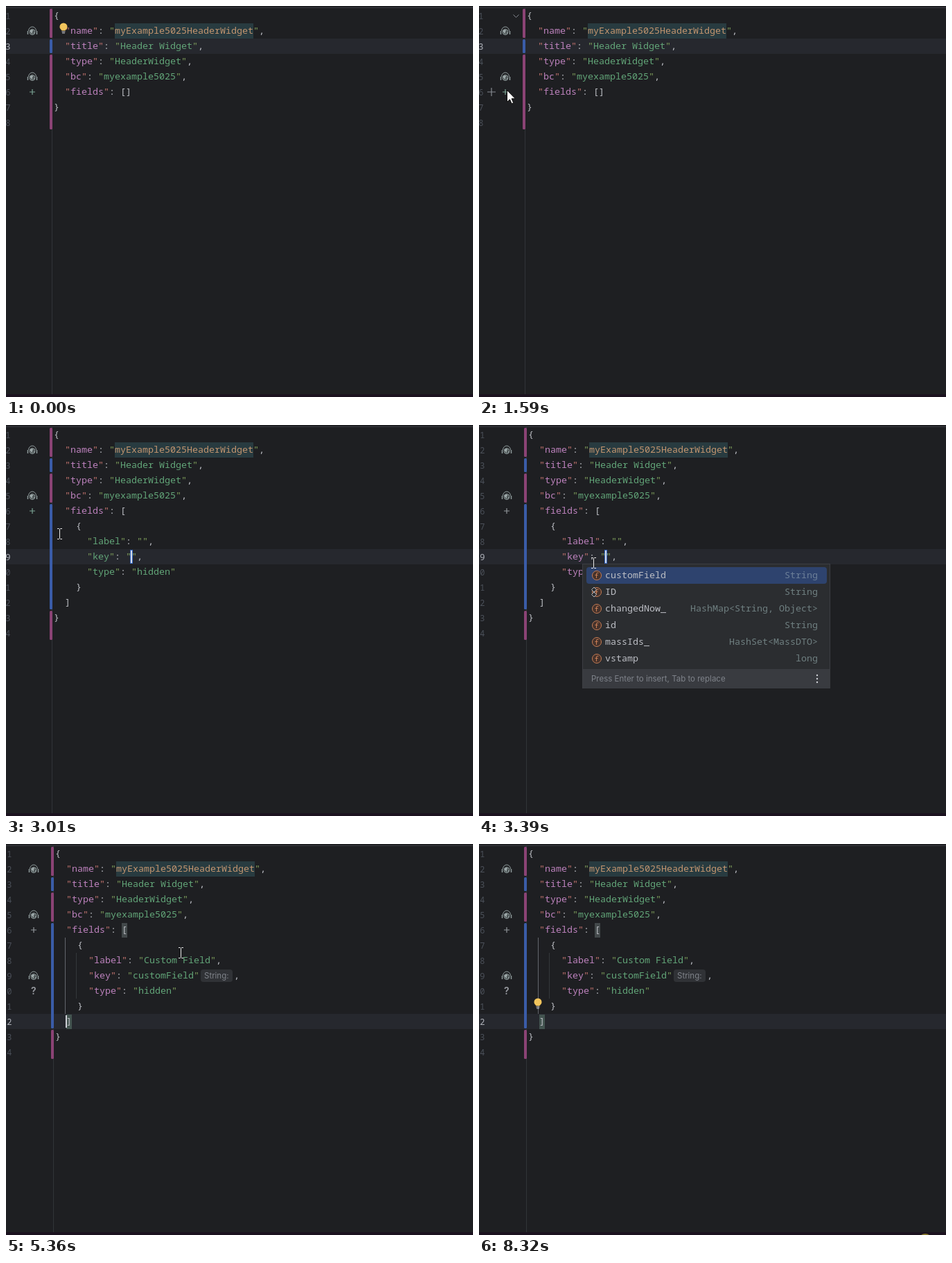
Write an HTML page that moves like this. It is 674 px wide and 564 px high and loops after 8.46 s.

```html
<!DOCTYPE html>
<html lang="en">
<head>
<meta charset="utf-8">
<title>Widget editor</title>
<style>
  html, body { margin: 0; width: 100%; height: 100%; overflow: hidden; background: #1e1f22; }
  svg { display: block; width: 674px; height: 564px; }
  text { white-space: pre; }
  .mono { font: 13.333px "Noto Sans Mono", "DejaVu Sans Mono", monospace; }
  .num { font: 12px "Noto Sans Mono", "DejaVu Sans Mono", monospace; fill: #4b5059; text-anchor: end; }
  .ui { font: 13px Inter, "Open Sans", sans-serif; letter-spacing: .11px; fill: #dfe1e5; }
  .hint { font: 11.5px Inter, "Open Sans", sans-serif; fill: #7f838a; }
  .line { fill: none; stroke: #a9adb4; }
  .fill { fill: #a9adb4; }
  .cut { fill: none; stroke: #2b2d30; stroke-width: 1.6; }
</style>
</head>
<body>
<svg id="stage" viewBox="0 0 674 564"></svg>
<script>
const LOOP = 8460;
// Moments at which the editor switches state
const PICK = 2750, INSERT = 2820, COMPLETE = 3330, ACCEPT = 4470, LEAVE = 4670;

const rect = (x, y, w, h, fill, r = 0) =>
  `<rect x="${x}" y="${y}" width="${w}" height="${h}" rx="${r}" fill="${fill}"/>`;
const at = (x, y, body) => `<g transform="translate(${x} ${y})">${body}</g>`;
const during = (spans, body) => `<g data-on="${spans}">${body}</g>`;
const mono = (x, y, s, fill, more = "") =>
  `<text class="mono" x="${x}" y="${y}" fill="${fill}" ${more}>${s.replace(/</g, "&lt;")}</text>`;
const rowY = i => 14 + 22 * i;

// --- Code ---
const STRING = "#62a578", KEY = "#bd82bd";

function codeRow(src, i, keyInk) {
  let out = "";
  const put = (col, s, fill) => { out += mono(69 + col * 8, rowY(i) + 4, s, fill); };
  for (const m of src.matchAll(/"([^"]*)"(:?)|[^\s"]/g)) {
    const col = m.index;
    if (m[1] === undefined) { put(col, m[0], "#bcbec4"); continue; }
    const key = m[2] === ":", end = col + m[1].length + 1;
    const quote = key && keyInk === KEY ? "#c6756f" : "#80a05c";
    const ink = key ? keyInk : m[1].startsWith("myEx") && i === 1 ? "#c2956f" : STRING;
    put(col, '"', quote);
    put(col + 1, m[1], ink);
    put(end, '"', quote);
    if (key) put(end + 1, ":", "#bcbec4");
  }
  return out;
}
const code = (rows, first = 0, keyInk = KEY) => rows.map((s, i) => codeRow(s, i + first, keyInk)).join("");

const numbers = n => Array.from({ length: n }, (_, i) =>
  `<text class="num" x="6.5" y="${rowY(i) + 5}">${i + 1}</text>`).join("");

const current = i => rect(-4, rowY(i) - 11, 682, 22, "#26282e");
const currentNum = i => `<text class="num" x="6.5" y="${rowY(i) + 5}" style="fill:#a9abb2">${i + 1}</text>`;
const bar = (from, to, fill) => rect(63, rowY(from) - 10, 4, (to - from + 1) * 22 - 2, fill, 1.5);
const PURPLE = "#8b4375", BLUE = "#3a5ca8";

const globe = i => at(38, rowY(i), `
  <path d="M-5.500 0a5.500 6 0 0 1 11 0" fill="none" stroke="#8f9b9c"/>
  <path d="M-6.500 0v5M6.500 0v5" stroke="#8f9b9c" stroke-width="1.500"/>
  <circle cy="1.500" r="4" fill="#4a5253" stroke="#8f9b9c"/>
  <path d="M-3.500 0l3-2 2 2-2 1 1 3-2-1zM2 2h1.500l-1 2z" fill="#a4afb0"/>`);
const plus = (x, y, r, ink) =>
  `<path d="M${x - r} ${y}h${2 * r}M${x} ${y - r}v${2 * r}" stroke="${ink}" stroke-width="1.2"/>`;
const bulb = (x, y) => at(x, y, `
  <path d="M-2.5 3.5C-3 2-5.5 1-5.5-2a5.5 5.5 0 0 1 11 0C5.5 1 3 2 2.5 3.5z" fill="#f2c55c"/>
  <path d="M-2.5 5h5M-2 7h4" stroke="#c9ccd2" stroke-width="1.2"/>`);

const head = ['{', '  "name": "myExample5025HeaderWidget",', '  "title": "Header Widget",',
  '  "type": "HeaderWidget",', '  "bc": "myexample5025",'];
const open = '  "fields": [', close = ['    }', '  ]', '}'];
const members = (label, key) => ['    {', `      "label": "${label}",`,
  `      "key": "${key}"${key ? "" : ","}`, '      "type": "hidden"'];

const shared = rect(157, 25, 200, 22, "#283b40") + globe(1) + globe(4) +
  during(`0-${COMPLETE}`, plus(38, 124, 4, "#7ba394")) + during(`${COMPLETE}-${LOOP}`, plus(38, 124, 4, "#92979b")) +
  code(head);

const before = current(2) + numbers(8) + currentNum(2) +
  bar(0, 1, PURPLE) + bar(2, 2, BLUE) + bar(3, 7, PURPLE) + code([open + ']', '}'], 5);

const after = during(`${INSERT}-${LEAVE}`, current(8)) + during(`${LEAVE}-${LOOP}`, current(11)) +
  numbers(14) +
  during(`${INSERT}-${LEAVE}`, currentNum(8)) + during(`${LEAVE}-${LOOP}`, currentNum(11)) +
  bar(0, 1, PURPLE) + bar(2, 2, BLUE) + bar(3, 4, PURPLE) + bar(5, 11, BLUE) + bar(12, 13, PURPLE) +
  during(`${LEAVE}-${LOOP}`,
    rect(165, 114, 8, 21, "#43494b") + rect(85, 246, 8, 21, "#435450") +
    rect(83, 135, 1, 110, "#62666c") + rect(99, 157, 1, 66, "#34373b")) +
  code([open], 5) + code(close, 10) +
  // New keys are green until the file is parsed again
  during(`${INSERT}-${COMPLETE}`, code(members("", ""), 6, STRING)) +
  during(`${COMPLETE}-${ACCEPT}`, code(members("", ""), 6)) +
  during(`${ACCEPT}-${LOOP}`, code(members("Custom Field", "customField"), 6) +
    globe(8) + `<text class="ui" x="34" y="217" style="font-size:14px;font-weight:600;fill:#9a9da3">?</text>` +
    rect(279, 181, 46, 18, "#303236", 4) + `<text class="hint" x="284" y="194">String:</text>` +
    mono(327, 194, ",", "#bcbec4")) +
  during(`${INSERT}-3500 3970-${ACCEPT}`, rect(179, 180, 4, 20, "#3568c4") + rect(180, 181, 2, 18, "#d5dae4")) +
  during(`${LEAVE}-5870 6260-6880 7380-7890`, rect(84, 247, 2, 18, "#ced0d6"));

// --- Field type menu ---
const date = `<rect class="fill" x="-6.5" y="-6" width="13" height="12" rx="1.5"/><path class="cut" d="M-3.2-2H3.200V2.500H-3.200z"/>`;
const input = mark => `<path class="line" d="M3-4.5H-4a2.5 2.5 0 0 0-2.5 2.5V2A2.5 2.5 0 0 0-4 4.5H3M3-6.5h4M5-6.5v13M3 6.5h4M7-4v8"/>
  <path class="line" d="${mark}"/>`;
const boxes = shape => `${shape}<path class="line" d="M0-4H7M0 4H7" stroke-width="1.8"/>`;
const icons = {
  input: input("M-4-2H1M-1.5-2V2.5"),
  hidden: `<rect class="line" x="-6.5" y="-6.5" width="13" height="13" stroke-dasharray="1 1.5"/>`,
  text: `<rect class="line" x="-6.3" y="-5.5" width="12.6" height="11" rx="2" stroke-width="1.4"/>
    <path class="line" d="M-3-2.5H3M0-2.5V3" stroke-width="1.5"/>`,
  date,
  check: boxes(`<path class="line" d="M-6.5-6.5h5v5h-5zM-6.5 1.5h5v5h-5zM-5.5-4l1.2 1.2 2-2.5"/>`),
  dict: `<rect class="fill" x="-7" y="-4.5" width="14" height="9" rx="1.5"/><path d="M0-1h5L2.5 2z" fill="#2b2d30"/>`,
  upload: `<path class="fill" d="M-6.5-7h13v2h-13zM0-4l5.5 5.5H2V7H-2V1.5h-3.5z"/>`,
  number: input("M-4-1h1M-1.5-1h1M1-1h1"),
  percent: `<path d="M4-5L-4 5" stroke="#111214" stroke-width="1.6"/>
    <circle cx="-3.5" cy="-3" r="2" fill="none" stroke="#111214" stroke-width="1.6"/>
    <circle cx="3.5" cy="3" r="2" fill="none" stroke="#111214" stroke-width="1.6"/>`,
  money: `<rect class="fill" x="-7" y="-7" width="14" height="14" rx="1"/>
    <text class="ui" x="0" y="4.5" text-anchor="middle" style="font-size:12px;fill:#2b2d30">$</text>`,
  radio: boxes(`<circle class="line" cx="-4.5" cy="-4" r="2.5"/><circle class="line" cx="-4.5" cy="4" r="2.5"/>
    <circle class="fill" cx="-4.5" cy="-4" r="1"/>`),
  pick: `<rect class="line" x="-6.5" y="-4.5" width="13" height="9" rx="1.5"/><path class="fill" d="M-6-4H1V4H-6z"/>
    <path class="cut" d="M-4-1.5h3M-4 1.5h3"/>`,
};
const types = [["input field", "input"], ["hidden", "hidden"], ["text field", "text"],
  ["dateTime", "date"], ["time", "date"], ["time with format", "date"], ["checkbox", "check"],
  ["date", "date"], ["dateTimeWithSeconds", "date"], ["dictionary", "dict"],
  ["fileUpload", "upload"], ["number", "number"], ["percent", "percent"], ["money", "money"],
  ["radio", "radio"], ["pickList", "pick"], ["inlinePickList"]];
const menu = `<rect x="41.5" y="115.5" width="218" height="470" fill="#2b2d30" stroke="#43454a"/>` +
  `<rect id="choice" x="49" width="203" height="24" rx="4" fill="#2e436e"/>` +
  types.map(([name, icon], i) => at(64, 134 + 26 * i,
    (icons[icon] || "") + `<text class="ui" x="13" y="5">${name} (i)</text>`)).join("");

// --- Completion list ---
const options = [["customField", "String"], ["ID", "String"], ["changedNow_", "HashMap<String, Object>"],
  ["id", "String"], ["massIds_", "HashSet<MassDTO>"], ["vstamp", "long"]];
const completion = `<rect x="149.5" y="200.5" width="357" height="179" fill="#2b2d30" stroke="#3c3e43"/>` +
  rect(155, 205, 347, 24, "#2e436e", 4) +
  options.map(([name, type], i) => at(0, 217 + 24 * i, `
    <circle cx="170" r="6.5" fill="#45322b" stroke="#c77d55"/>
    <path d="M172.5-3.5c-2.5-.8-3 .5-3 2V4M167.5-.5h4" fill="none" stroke="#c77d55" stroke-width="1.1"/>` +
    (i === 1 ? `<path d="M166-7l3.5 3.5-3.5 3.5-3.5-3.5zM166 0l3.5 3.5L166 7l-3.5-3.5z" fill="#2b2d30" stroke="#b4b8bf"/>` : "") +
    mono(182, 4, name, "#bcbec4") +
    mono(489, 4, type, i ? "#6f7f80" : "#6c7f98", 'text-anchor="end"'))).join("") +
  rect(150, 352, 357, 28, "#393b40") +
  `<text class="hint" x="162" y="370">Press Enter to insert, Tab to replace</text>` +
  [361, 366, 371].map(y => `<circle cx="488" cy="${y}" r="1.2" fill="#ced0d6"/>`).join("");

const stage = document.getElementById("stage");
stage.innerHTML = rect(0, 0, 674, 564, "#1e1f22") +
  `<g id="doc">${rect(66, 3, 1, 557, "#313438")}` +
  during(`0-${INSERT}`, before) + during(`${INSERT}-${LOOP}`, after) + shared +
  during("0-1590", bulb(83, 32)) + during(`5550-${LOOP}`, bulb(83, 230)) +
  during("630-1910", `<path d="M49.5 12.5l4 4 4-4" fill="none" stroke="#868a91"/>`) +
  during("630-1660 5550-6800", `<g id="hover">${plus(18, 0, 6, "#868a91")}</g>`) + `</g>` +
  rect(0, 2, 674, 1, "#393b40") + rect(0, 560, 674, 4, "#1b121f") +
  during(`1660-${PICK}`, menu) + during(`${COMPLETE}-${ACCEPT}`, completion) +
  during(`8320-${LOOP}`, `<circle cx="644" cy="572" r="10" fill="#85772c"/>`) +
  during("190-380 630-7380", `<g id="mouse">` +
    during(`630-${PICK}`, `<path d="M-.5-.5V16.5l4-3.700 2.600 6 2.600-1.100-2.600-6h5.200z" fill="#fff" stroke="#111"/>`) +
    during(`0-630 ${PICK}-${LOOP}`, `<path d="M-3-7.500h2.500l1 1 1-1H4M.5-6.500v13M-3 7.500h2.500l1-1 1 1H4"
      fill="none" stroke="#e8e8e8"/>`) + `</g>`);

// Pointer strokes: start, end, number of jumps, x, y reached
const strokes = [[190, 310, 3, 98, 148], [560, 561, 1, 74, 162], [630, 1030, 7, 51, 131],
  [1210, 1410, 3, 41, 122], [1910, 2430, 9, 77, 157], [3140, 3580, 8, 253, 241],
  [3760, 3900, 3, 245, 224], [4600, 4980, 7, 261, 163], [5360, 5361, 1, 252, 157],
  [5420, 5550, 3, 211, 82], [6120, 6260, 3, 205, 168], [6750, 7310, 9, 664, 537]];

function pointer(t) {
  let x = 806, y = 718;
  for (const [from, to, jumps, tx, ty] of strokes) {
    if (t < from) break;
    const k = Math.min(1, (Math.floor((t - from) / (to - from) * (jumps - 1) + 0.001) + 1) / jumps);
    x += (tx - x) * k;
    y += (ty - y) * k;
  }
  return [Math.round(x), Math.round(y)];
}

const timed = [...stage.querySelectorAll("[data-on]")].map(el =>
  [el, el.dataset.on.split(" ").map(span => span.split("-").map(Number))]);
const [doc, hover, choice, mouse] = ["doc", "hover", "choice", "mouse"].map(id => document.getElementById(id));
const move = (el, x, y) => el.setAttribute("transform", `translate(${x} ${y})`);

function draw(t) {
  for (const [el, spans] of timed)
    el.style.display = spans.some(([a, b]) => t >= a && t < b) ? "" : "none";
  const [x, y] = pointer(t);
  move(mouse, x, y);
  move(doc, t < COMPLETE ? 0 : 2, 0);
  move(hover, 0, rowY(Math.floor((y - 3) / 22)));
  choice.setAttribute("y", y > 147 ? 148 : 122);
}

const start = performance.now();
function tick(now) {
  draw(Math.max(0, now - start) % LOOP);
  requestAnimationFrame(tick);
}
draw(0);
requestAnimationFrame(tick);
</script>
</body>
</html>
```
